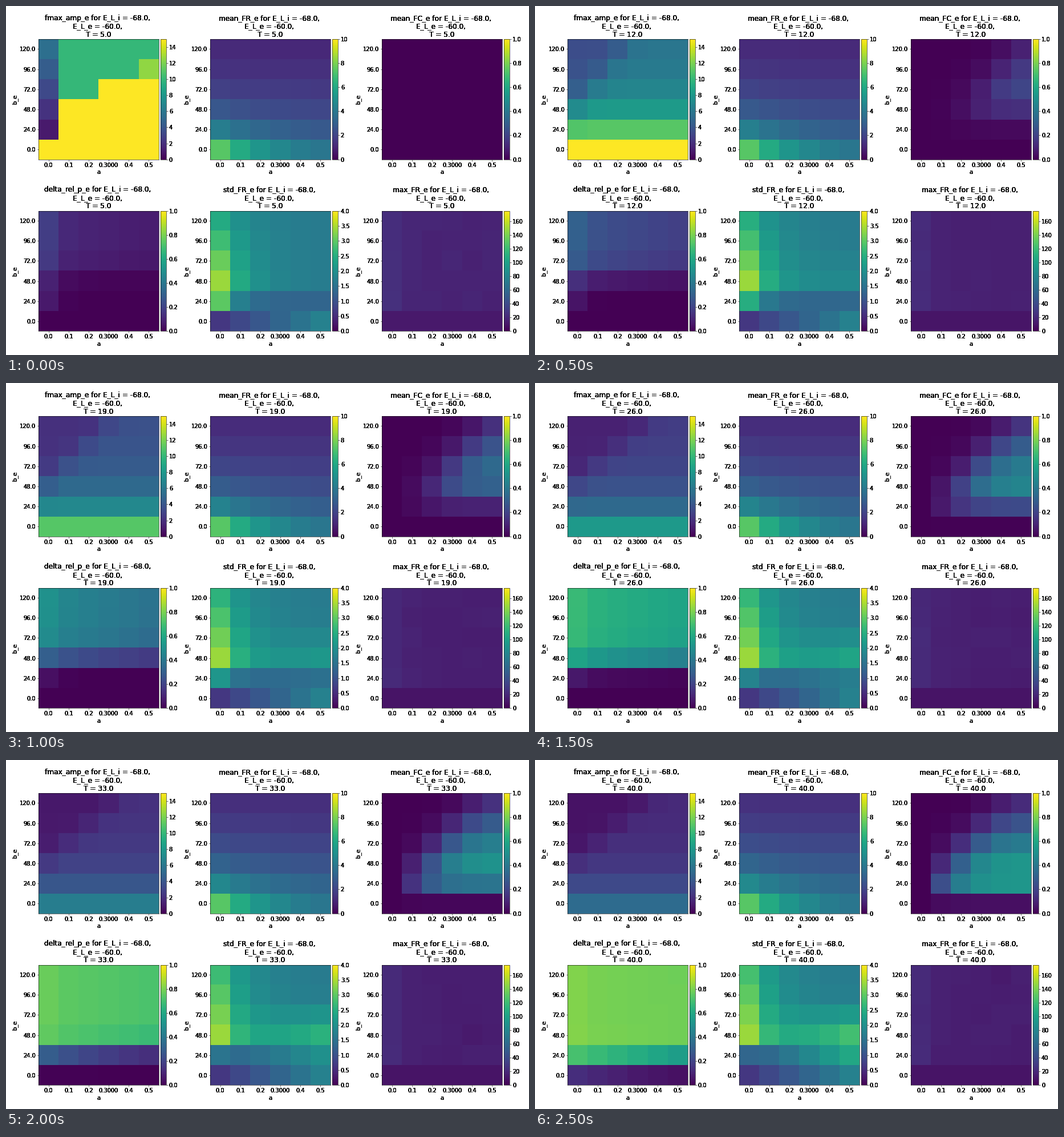
Write a matplotlib script that moves like this. It is 917 px wide and 611 px high and loops after 3000 ms.

```python
import numpy as np
import matplotlib.pyplot as plt
from matplotlib.animation import FuncAnimation
from matplotlib.text import Text

W, H, DPI = 917, 611, 64
FRAMES, INTERVAL = 6, 500
SIDE, BAR_GAP, BAR_W = 210.7, 3.2, 9.8
LEFTS, TOPS = (57.1, 358.1, 659.2), (57.9, 358.6)
PASSES = 6  # repeated drawing gives the dense, dark lettering
SPACE = 4   # the first two title lines end in a blank of this width


def px(v):
    return v * 72 / DPI


plt.rcParams.update({
    "font.family": "DejaVu Sans",
    "font.size": px(9.9),
    "axes.labelpad": px(2.83),
    "axes.linewidth": px(0.57),
})
for axis in ("xtick", "ytick"):
    plt.rcParams.update({
        f"{axis}.major.size": px(2.5),
        f"{axis}.major.pad": px(2.5),
        f"{axis}.major.width": px(0.57),
    })

# Cell indices: x runs right with a, j runs up with b_e
j, x = np.mgrid[5:-1:-1, 0:6].astype(float)
above = j > 0
rng = np.random.default_rng(4)


def period(k):
    return 5 + 7 * k


def sigmoid(v):
    return 1 / (1 + np.exp(-v))


def fmax_amp(k):
    t = period(k)
    if t < 10:
        # two plateaus split by a diagonal, slow first column
        upper = np.clip(2.5 * (j - 2 - 0.4 * x) + 0.5, 0, 1)
        return np.where((x == 0) & above, 1.1 * j, 15 - 5 * upper)
    peak = (68 + 142 * np.exp(-0.78 * j)) / t
    corner = 1.2 * (j - 2) * min(1, 0.55 + 0.15 * k) - x
    return peak * (1 - (0.35 + 0.05 * k) * sigmoid(3 * (corner - 0.3)))


def mean_fr(k):
    level = 0.6 + 2.7 * np.exp(-0.32 * j)
    growth = 0.18 * k * j * np.exp(-0.6 * j)
    return level + 4.1 * np.exp(-0.9 * j - 0.38 * x) + growth


def mean_fc(k):
    height = 0.62 * (1 - np.exp(-0.45 * k))
    off = j - (3.3 - 0.4 * k)
    ridge = np.exp(-(off / np.where(off > 0, 3.2, 1.3)) ** 2)
    onset = 0.4 + 0.7 * j + 0.2 * (5 - k)
    field = height * ridge * sigmoid(1.6 * (x - onset))
    return field * (x > 0) * np.where(above, 1, 0.2)


def delta_rel_p(k):
    low = np.exp(-0.4 * j ** 2)
    onset = 1.9 + 3.8 * low + 0.08 * (x - 2)
    rise = 0.82 * sigmoid((1.05 + 2 * low) * (k - onset))
    return rise + 0.07 * np.exp(-2 * x - 0.3 * k) * above


def std_fr(k):
    first = 3.4 - (j - 2) * (0.32 - 0.025 * k)
    ridge = 0.044 * k * x * np.exp(-0.8 * (j - 2) ** 2)
    field = 1.65 + (first - 1.65) * np.exp(-0.8 * x) + ridge
    second = (1.3 + 1.7 * np.exp(-1.4 * x - 0.35 * k)
              + 0.011 * k ** 2 * (x - 1))
    return np.where(j == 0, 0.65 + 0.22 * x, np.where(j == 1, second, field))


def max_fr(k):
    spread = rng.normal(0, 0.6, j.shape)
    return 9 + 3 * np.exp(-k) + above * (5.5 + 6 * np.exp(-1.3 * x) + spread)


# name, field rule, colour range top, colour bar tick step
PANELS = [
    ("fmax_amp_e", fmax_amp, 15, 2),
    ("mean_FR_e", mean_fr, 10, 2),
    ("mean_FC_e", mean_fc, 1, 0.2),
    ("delta_rel_p_e", delta_rel_p, 1, 0.2),
    ("std_FR_e", std_fr, 4, 0.5),
    ("max_FR_e", max_fr, 175, 20),
]

fig = plt.figure(figsize=(W / DPI, H / DPI), dpi=DPI, facecolor="white")


def box(left, top, width, height):
    return fig.add_axes([left / W, 1 - (top + height) / H, width / W, height / H])


def title_line(cx, y, text):
    return fig.text(cx / W, 1 - y / H, text, fontsize=px(12.15),
                    ha="center", va="baseline")


def add_panel(i, name, rule, vmax, step):
    left, top = LEFTS[i % 3], TOPS[i // 3]
    fields = [rule(k) for k in range(FRAMES)]
    ax = box(left, top, SIDE, SIDE)
    im = ax.imshow(fields[0], cmap="viridis", vmin=0, vmax=vmax,
                   aspect="auto", interpolation="nearest")
    ax.set_xticks(range(6), ["0.0", "0.1", "0.2", "0.3000", "0.4", "0.5"])
    ax.set_yticks(range(6), [f"{b:.1f}" for b in range(120, -1, -24)])
    ax.set_xlabel("a")
    ax.set_ylabel("b_e")
    cax = box(left + SIDE + BAR_GAP, top, BAR_W, SIDE)
    fig.colorbar(im, cax=cax, ticks=np.arange(0, vmax + step / 100, step))

    cx = left + SIDE / 2
    title_line(cx - SPACE / 2, top - 33.3, f"{name} for E_L_i = -68.0,")
    title_line(cx - SPACE / 2, top - 18.8, "E_L_e = -60.0,")
    return fields, im, title_line(cx, top - 4.2, "")


def embolden(text):
    draw = text.draw

    def draw_dense(renderer):
        for _ in range(PASSES):
            draw(renderer)

    text.draw = draw_dense


views = [add_panel(i, *panel) for i, panel in enumerate(PANELS)]
for text in fig.findobj(Text):
    embolden(text)


def update(k):
    for fields, im, caption in views:
        im.set_data(fields[k])
        caption.set_text(f"T = {period(k):.1f}")
    return []


anim = FuncAnimation(fig, update, frames=FRAMES, interval=INTERVAL,
                     init_func=lambda: update(0), repeat=True, blit=False)
plt.show()
```
